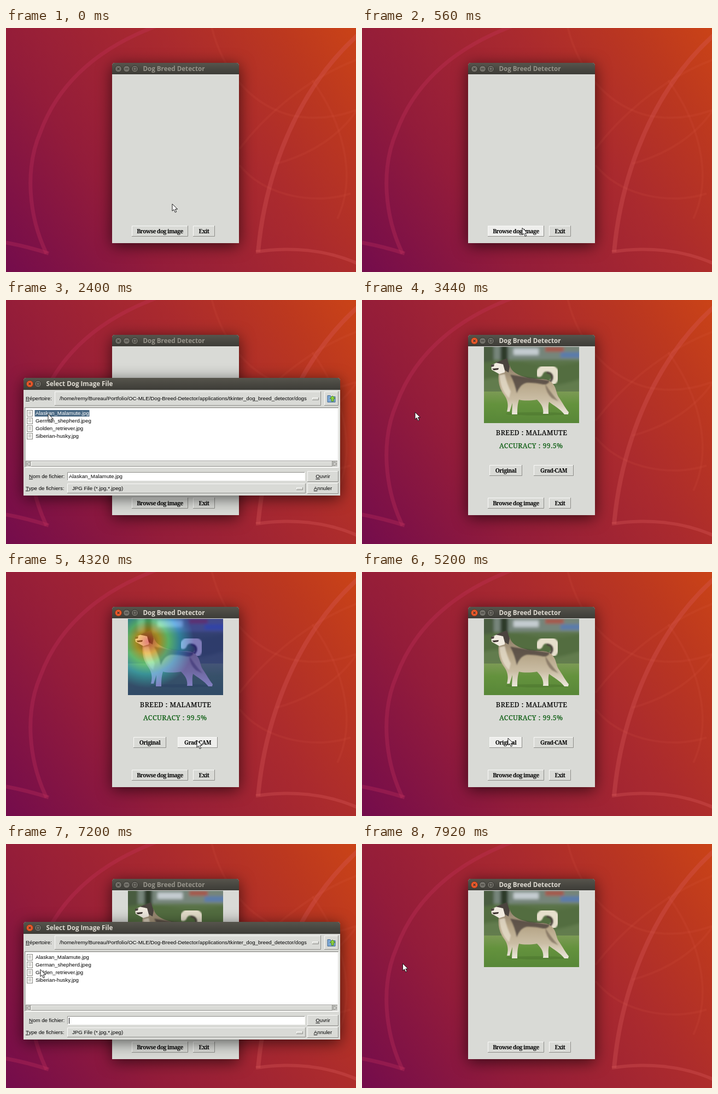
An HTML page for the animation above (8000 ms loop, 640 px wide and 448 px high).

```html
<!DOCTYPE html>
<html lang="en">
<head>
<meta charset="utf-8">
<title>Dog Breed Detector</title>
<style>
  html, body { margin: 0; width: 100%; height: 100%; overflow: hidden; background: #a32436; }
  svg { display: block; width: 640px; height: 448px; }
  text { font: 9.7px "Liberation Sans", Arial, sans-serif; fill: #000; white-space: pre; }
  .title { font: 700 11.6px "Open Sans", sans-serif; fill: #dfdbd2; }
  .idle .title { fill: #96938a; }
  .knob { fill: #73716a; stroke: #35342f; }
  .close { fill: #ee5a2c; stroke: #8a3213; }
  .idle .close { fill: #73716a; stroke: #35342f; }
  .glyph { fill: none; stroke: #3a3833; stroke-width: 1.2; }
  .button { font: 700 10.3px "Noto Serif", serif; letter-spacing: -.6px; }
  .result { font: 500 12.3px "Noto Serif", serif; letter-spacing: .5px; stroke: #000; stroke-width: .25px; }
  .score { fill: #0a5c10; stroke: #0a5c10; }
  .mid { text-anchor: middle; }
  .key { text-decoration: underline; }
  .hot > .face { fill: #eeeeec; }
  .picked { fill: #fff; }
  .lines { fill: none; }
  .shadow { filter: drop-shadow(0 5px 14px rgba(0, 0, 0, .62)); }
</style>
</head>
<body>
<svg viewBox="0 0 640 448">
  <defs>
    <linearGradient id="sky" gradientUnits="userSpaceOnUse" x1="0" y1="448" x2="640" y2="0">
      <stop offset="0" stop-color="#740c4c"/>
      <stop offset=".3" stop-color="#931c3a"/>
      <stop offset=".62" stop-color="#aa2a2e"/>
      <stop offset=".85" stop-color="#bc381f"/>
      <stop offset="1" stop-color="#ca4317"/>
    </linearGradient>
    <linearGradient id="bar" x2="0" y2="1">
      <stop offset="0" stop-color="#56544c"/>
      <stop offset="1" stop-color="#3d3c37"/>
    </linearGradient>
    <linearGradient id="grass" x2="0" y2="1">
      <stop offset="0" stop-color="#7c9a55"/>
      <stop offset=".4" stop-color="#64923d"/>
      <stop offset="1" stop-color="#588738"/>
    </linearGradient>
    <linearGradient id="coat" x2="0" y2="1">
      <stop offset="0" stop-color="#8a7b68"/>
      <stop offset=".35" stop-color="#b5a486"/>
      <stop offset=".7" stop-color="#cabda4"/>
      <stop offset="1" stop-color="#ece8dc"/>
    </linearGradient>
    <radialGradient id="heat" gradientUnits="userSpaceOnUse" cx="36" cy="42" r="85">
      <stop offset="0" stop-color="#d00000"/>
      <stop offset=".25" stop-color="#ffb000"/>
      <stop offset=".45" stop-color="#60ff90"/>
      <stop offset=".7" stop-color="#0090ff"/>
      <stop offset="1" stop-color="#0000a0"/>
    </radialGradient>
    <filter id="soft"><feGaussianBlur stdDeviation="2.5"/></filter>
    <filter id="fur"><feGaussianBlur stdDeviation="1"/></filter>
    <clipPath id="frame"><rect width="174" height="140"/></clipPath>
  </defs>

  <rect width="640" height="448" fill="url(#sky)"/>
  <g class="lines">
    <g stroke="#c8325f" stroke-opacity=".3">
      <path stroke-width="7" d="M74 414C41 345 34 258 63 191C92 112 154 42 276-4"/>
      <path stroke-width="7" d="M0 394Q42 402 78 414"/>
    </g>
    <g stroke="#d85a58" stroke-opacity=".33">
      <path stroke-width="8" d="M461 411C470 310 510 135 642 14"/>
      <path stroke-width="6" d="M457 411C520 401 585 407 642 432"/>
    </g>
    <g stroke="#e2644c" stroke-opacity=".1" stroke-width="4">
      <path d="M376-2C395 75 445 140 520 160C565 170 605 164 642 150"/>
      <path d="M427 222C470 165 545 95 642 58"/>
      <path d="M427 252C475 310 565 325 630 304"/>
      <path d="M494 249C560 232 612 195 642 150"/>
      <path d="M560 96C610 165 645 265 606 350"/>
    </g>
  </g>

  <g id="main">
    <g id="shell"></g>
    <g id="photo" transform="translate(223 86)" clip-path="url(#frame)">
      <rect width="174" height="140" fill="#5a7348"/>
      <g filter="url(#soft)">
        <rect x="-5" y="-5" width="184" height="29" fill="#76857a"/>
        <path fill="#4a5c40" d="M-5-5H18V34H-5Z"/>
        <path fill="#2f3a2c" d="M30-5H44V30H30Z"/>
        <path fill="#c4ccd0" d="M54 3H100V15H54Z"/>
        <path fill="#a5594b" d="M112 0H146V9H112Z"/>
        <path fill="#5a7cab" d="M140 10H180V20H140Z"/>
        <path fill="#536d40" d="M-5 29Q40 22 85 31T180 27V80H-5Z"/>
        <path fill="#6d8757" opacity=".6" d="M-5 62Q30 50 70 66T180 58V84H-5Z"/>
      </g>
      <rect y="82" width="174" height="58" fill="url(#grass)"/>
      <ellipse cx="98" cy="123" rx="58" ry="3" fill="#47702c" opacity=".45"/>
      <g fill="none" stroke-linecap="round" filter="url(#fur)">
        <path stroke="#e6dfcc" stroke-width="13" d="M125 65C136 55 133 40 117 39C109 38 103 43 101 49"/>
        <path stroke="#4d443c" stroke-width="4" d="M120 65C128 58 126 49 116 47"/>
      </g>
      <path fill="url(#coat)" d="M27 48C32 36 41 30 47 34C51 47 62 52 80 57C98 61 112 56 122 64C133 72 131 84 137 93C144 103 149 113 155 120L154 124H147C140 114 126 107 119 101C117 108 118 116 118 123H108C110 112 104 104 97 97C84 99 72 99 64 97C61 107 61 116 61 124H51L52 103L47 119H42C46 104 42 95 36 87C28 76 25 62 27 48Z"/>
      <g filter="url(#fur)">
        <path fill="#e8e0cf" opacity=".75" d="M28 52L38 50Q42 68 49 82L46 94Q30 80 28 52Z"/>
        <path fill="#433b36" opacity=".75" d="M48 51Q84 57 120 62Q118 70 108 69Q95 66 84 66Q68 64 60 85Q57 68 48 51Z"/>
        <path fill="#6b5c4c" opacity=".6" d="M112 68Q122 84 136 100L124 94Q113 84 112 68Z"/>
      </g>
      <path fill="#f0eadf" d="M13 34L27 27L39 32L38 47L28 50L14 42Z"/>
      <path fill="#4a433e" d="M21 29L32 25L42 21L47 36L45 47L38 43L35 32ZM13 33L19 32L18 36L13 37Z"/>
      <path fill="#3a302c" d="M15 40L27 39L26 42L18 43Z"/>
      <rect id="heatmap" width="174" height="140" fill="url(#heat)" opacity=".45"/>
    </g>
    <g id="results">
      <text class="result mid" x="310.3" y="247.5">BREED : MALAMUTE</text>
      <text class="result score mid" x="309.3" y="272">ACCURACY : 99.5%</text>
    </g>
  </g>
  <g id="dialogs"></g>
  <path id="pointer" fill="#fff" stroke="#1a1a1a" stroke-linejoin="round" d="M0 0V13L3 10.3L5.3 15.5L7.6 14.5L5.4 9.6H9.6Z"/>
</svg>
<script>
const LOOP = 8000, STEP = 80;
const $ = id => document.getElementById(id);

// Widgets
const rect = (x, y, w, h, fill, more = '') =>
  `<rect x="${x}" y="${y}" width="${w}" height="${h}" fill="${fill}" ${more}/>`;
const text = (x, y, label, cls = '') => `<text x="${x}" y="${y}" class="${cls}">${label}</text>`;
const keyed = label => `<tspan class="key">${label[0]}</tspan>${label.slice(1)}`;

function bevel(x, y, w, h, sunken, fill = '#d9dad6') {
  const [light, dark] = sunken ? ['#8d8d89', '#fafaf8'] : ['#fafaf8', '#8d8d89'];
  return rect(x, y, w, h, fill, 'class="face"') +
    `<path fill="none" stroke="${light}" d="M${x + .5} ${y + h}V${y + .5}H${x + w}"/>` +
    `<path fill="none" stroke="${dark}" d="M${x} ${y + h - .5}H${x + w - .5}V${y}"/>`;
}

function knobs(x, y, count) {
  const glyphs = { close: 'M-2-2L2 2M2-2L-2 2', min: 'M-3 0H3', max: 'M-2.5-2.5H2.5V2.5H-2.5Z' };
  const names = count === 3 ? ['close', 'min', 'max'] : ['close', 'max'];
  return names.map((name, i) => `<g transform="translate(${x + i * 15} ${y})">
    <circle r="6" class="knob ${name}"/><path class="glyph" d="${glyphs[name]}"/></g>`).join('');
}

function frame(x, y, w, h, bar, title, count) {
  const r = x + w;
  return `<path class="shadow" fill="#d9dad6" d="M${x} ${y + h}V${y + 5}q0-5 5-5H${r - 5}q5 0 5 5V${y + h}Z"/>
    <path fill="url(#bar)" d="M${x} ${y + bar}V${y + 5}q0-5 5-5H${r - 5}q5 0 5 5V${y + bar}Z"/>` +
    knobs(x + 11.5, y + 11, count) + text(x + 11.5 + count * 15, y + 15, title, 'title');
}

// Main window
const buttons = [
  { label: 'Browse dog image', x: 230, y: 363, w: 103 },
  { label: 'Exit', x: 342, y: 363, w: 40 },
  { label: 'Original', x: 233, y: 303, w: 60 },
  { label: 'Grad-CAM', x: 314, y: 303, w: 73 }
];
const drawButton = ({ label, x, y, w }, i) =>
  `<g id="button${i}">${bevel(x, y, w, 20)}${text(x + w / 2, y + 14, label, 'button mid')}</g>`;

$('shell').innerHTML = frame(194, 64, 232, 331, 21, 'Dog Breed Detector', 3) +
  buttons.slice(0, 2).map(drawButton).join('');
$('results').innerHTML += buttons.slice(2).map((b, i) => drawButton(b, i + 2)).join('');

// File dialog
const home = '/home/remy/Bureau/Portfolio/OC-MLE/Dog-Breed-Detector/applications/tkinter_dog_breed_detector';
const folders = ['data_files', 'dog_breed_detector_package', 'dogs', 'hooks'];
const files = ['Alaskan_Malamute.jpg', 'German_shepherd.jpeg', 'Golden_retriever.jpg', 'Siberian-husky.jpg'];

const folderIcon = y => `<path fill="#4a7db8" stroke="#38618f" stroke-width=".8" d="M38.5 ${y - 5}h5l1 2h5v8h-11z"/>` +
  rect(39, y - 1, 11, 5.5, '#8fb9e4');
const fileIcon = y => rect(38.5, y - 5.5, 10, 11, '#f4f4f2', 'stroke="#8a8a86"') +
  `<path stroke="#b5b5b1" d="M41 ${y - 2.5}h5M41 ${y - .5}h5M41 ${y + 1.5}h5"/>`;

function dialog(id, inside, picked = -1) {
  const right = inside ? 611 : 587;
  const names = inside ? files : folders;
  const rows = names.map((name, i) => {
    const y = 208 + i * 14, on = i === picked;
    const bar = on ? rect(52.5, y - 6, inside ? 100 : 23, 12, '#4a6984') : '';
    return (inside ? fileIcon(y) : folderIcon(y)) + bar + text(54, y + 3.2, name, on ? 'picked' : '');
  }).join('');
  const entry = inside && picked >= 0 ? text(115, 327.3, files[picked]) : rect(115, 319, 1, 11, '#000');
  return `<g id="${id}">` + frame(32, 143, right - 32, 216, 22, 'Select Dog Image File', 2) +
    text(36, 184, keyed('Répertoire:')) +
    bevel(89, 168, right - 124, 26) + text(98, 184, home + (inside ? '/dogs' : '')) +
    bevel(right - 51, 179, 12, 5) +
    bevel(right - 29, 168, 26, 26) +
    `<g transform="translate(${right - 23} 174)">
      <path fill="#7fa8d6" stroke="#3d6794" d="M0 1.5h5l1 2h8v10h-14z"/>
      <path fill="#8fd03c" stroke="#4c8a18" d="M9 2l5 5h-3v5h-4v-5h-3z"/></g>` +
    bevel(34, 197, right - 36, 111, true) + rect(36, 199, right - 40, 96, '#fff') + rows +
    bevel(36, 295, right - 40, 12, true, '#c3c3bf') + bevel(46, 296, right - 60, 10) +
    `<path fill="#d9dad6" stroke="#8d8d89" d="M44 297.5v7l-6-3.5zM${right - 12} 297.5v7l6-3.5z"/>` +
    text(42, 327.3, keyed('Nom de fichier:')) +
    bevel(112, 316, right - 176, 16, true, '#fff') + entry +
    text(36, 349, keyed('Type de fichiers:')) +
    bevel(112, 337, right - 175, 18) + text(121, 349, 'JPG File (*.jpg,*.jpeg)') +
    bevel(right - 80, 344, 12, 5) +
    bevel(right - 60, 314, 57, 20) + text(right - 31.5, 327.3, keyed('Ouvrir'), 'mid') +
    bevel(right - 60, 336, 57, 20) + text(right - 31.5, 349, keyed('Annuler'), 'mid') + '</g>';
}

const views = { root: [false], rootPick: [false, 2], dogs: [true], pickFirst: [true, 0], pickSecond: [true, 1] };
$('dialogs').innerHTML = Object.entries(views).map(([id, args]) => dialog(id, ...args)).join('');

// Timeline: [start, dialog view]
const opened = [
  [0, ''], [640, 'root'], [1360, 'rootPick'], [1600, 'dogs'], [2400, 'pickFirst'], [2640, ''],
  [5920, 'root'], [6720, 'rootPick'], [6880, 'dogs'], [7520, 'pickSecond'], [7760, '']
];
// Pointer stops: [time, x, y]
const path = [
  [0, 304, 323], [480, 293, 367], [720, 293, 367], [880, 105, 312], [1120, 62, 208],
  [1200, 48, 222], [1360, 60, 235], [1840, 60, 235], [2320, 77, 209], [2800, 77, 209],
  [2960, 97, 206], [3600, 97, 206], [4160, 349, 309], [4400, 349, 309], [4880, 267, 305],
  [5200, 267, 305], [5760, 266, 372], [5920, 266, 372], [6560, 59, 234], [7120, 59, 234],
  [7440, 74.5, 219.5], [LOOP, 74.5, 219.5]
];

function pointerAt(t) {
  const i = path.findIndex(p => p[0] > t);
  const [t0, x0, y0] = path[i - 1], [t1, x1, y1] = path[i];
  const k = (t - t0) / (t1 - t0);
  return [x0 + (x1 - x0) * k, y0 + (y1 - y0) * k];
}

const within = (t, from, to) => t >= from && t < to;
const show = (id, on) => { $(id).style.display = on ? '' : 'none'; };

function draw(t) {
  const view = opened.filter(v => v[0] <= t).pop()[1];
  Object.keys(views).forEach(id => show(id, id === view));
  const closing = within(t, 2560, 2640) || within(t, 7680, 7760);
  $('dialogs').setAttribute('opacity', closing ? .5 : 1);

  show('photo', t >= 3440);
  show('heatmap', within(t, 4320, 5120));
  show('results', within(t, 3440, 7680));
  $('main').classList.toggle('idle', t < 2560 || within(t, 5920, 7680));

  const [x, y] = pointerAt(t);
  $('pointer').setAttribute('transform', `translate(${x.toFixed(1)} ${y.toFixed(1)})`);
  buttons.forEach((b, i) => $('button' + i).classList.toggle('hot',
    !view && within(x, b.x, b.x + b.w) && within(y, b.y, b.y + 20)));
}

let last = -1;
const start = performance.now();
function tick() {
  const t = Math.floor((performance.now() - start) % LOOP / STEP) * STEP;
  if (t !== last) draw(last = t);
  requestAnimationFrame(tick);
}
tick();
</script>
</body>
</html>
```
